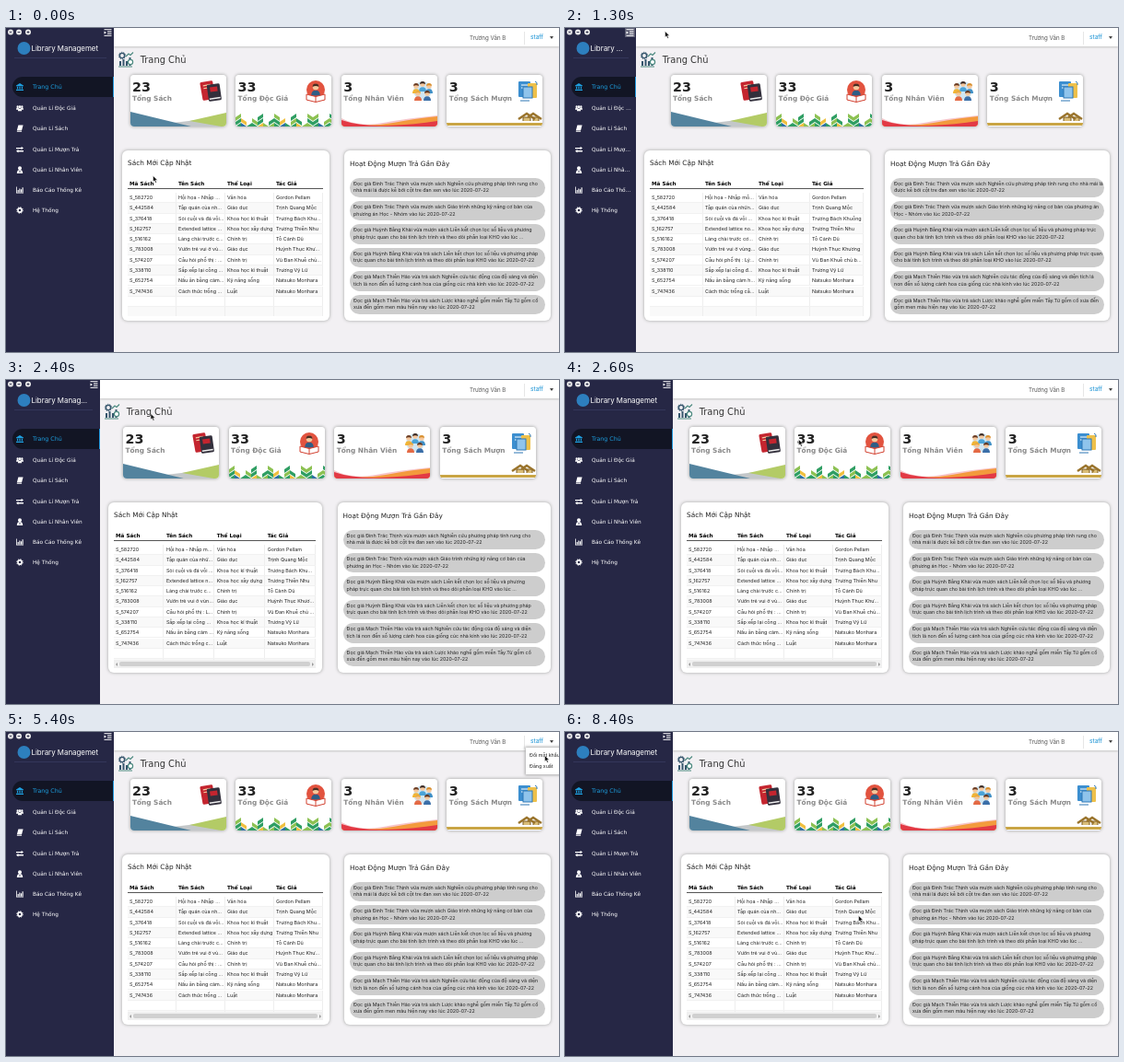
Animation of 600 by 352 pixels, one loop 8500 ms. Source, as an HTML page:

```html
<!DOCTYPE html>
<html lang="vi">
<head>
<meta charset="utf-8">
<title>Library Managemet</title>
<style>
html, body { margin: 0; width: 100%; height: 100%; overflow: hidden; }
#stage {
  --w: 116.5px;
  --half: calc((116.5px - var(--w)) / 2);
  position: relative; width: 600px; height: 352px; overflow: hidden;
  background: #f2f0f3; color: #222; font: 5.4px Inter, Roboto, sans-serif;
}
#stage div, #stage svg { position: absolute; box-sizing: border-box; }
#stage .t { white-space: nowrap; transform: translateY(-50%); line-height: 1.4; }
.v { font-family: "DejaVu Sans", sans-serif; }
.b { font-weight: 700; }
.cut { overflow: hidden; text-overflow: ellipsis; }

#header { left: var(--w); right: 0; top: 0; height: 20px; background: #fff; box-shadow: 0 1px 2px #c4c4c4; }
#caret { left: 590px; top: 9px; border: 2.5px solid transparent; border-top: 3px solid #444; border-bottom: 0; }
#title { left: calc(var(--w) + 4.2px); top: 24.5px; width: 80px; height: 18px; }

#side { left: 0; top: 0; width: var(--w); height: 352px; overflow: hidden; background: #262745; color: #fff; }
#side .rule { left: 9px; right: 8px; top: 32px; height: 1px; background: #34365a; }
#side .active { left: 7px; right: 0; top: 53px; height: 22px; border-radius: 11px 0 0 11px; background: #121524; border-right: 1px solid #1f97dc; }
#side .label { left: 29px; width: calc(var(--w) - 32.5px); font-size: 5.8px; }
#side .on { color: #1d9fe0; }
#side .label.on { font-size: 6.3px; }
#brand { left: 27.5px; top: 22.5px; width: calc(var(--w) - 37px); font-size: 7.9px; }
.narrow #side .label, .narrow #brand { display: none; }
#toggle { left: max(43px, calc(var(--w) - 12px)); top: 0; width: 11px; height: 10px; color: #fff; }
#toggle.hover { background: #5d5e74; }
.narrow #toggle { background: #e2e2e2; color: #777; }

.card { top: 51.3px; width: 104px; height: 56px; border-radius: 4px; overflow: hidden; background: #fff; }
.cardbox { top: 51.3px; width: 104px; height: 56px; border-radius: 4px; box-shadow: 0 0 3px 1px #bbb; }
.panel { top: 133px; height: 185px; border-radius: 6px; background: #fff; box-shadow: 0 0 3px 1px #c2c2c2; }
#books { left: calc(var(--w) + 9px); width: calc(341.5px - var(--half) - var(--w)); }
#log { left: calc(367px - var(--half)); right: 9px; }
#table { left: 6px; right: 7px; top: 30.4px; height: 150px; overflow: hidden; }
.row { left: 0; right: 0; height: 11.28px; border-bottom: 1px solid #f1f1f1; }
.row.odd { background: #f9f9f9; }
.cell { width: 25%; height: 100%; padding-left: 2.5px; line-height: 11px; white-space: nowrap; border-right: 1px solid #eee; }
.head .cell { border: 0; font-size: 5.65px; color: #000; }
#scroll { left: 0; right: 0; top: 141px; height: 9px; background: #f0f0f0; }
#scroll .thumb { left: 6px; right: 6px; top: 2px; height: 5px; border-radius: 2px; background: #d0d0d0; }
#scroll .arrow { top: 2.5px; border: 2px solid transparent; }
.pill { left: 6px; right: 6px; height: 21.5px; border-radius: 10.7px; background: #cdcdcd; }
.pill div { left: 4px; top: 3px; line-height: 7.7px; white-space: pre; font-size: 5.32px; }

#menu { left: 564px; top: 17px; width: 50px; height: 29px; background: #fff; box-shadow: 0 0 3px 1px #aaa; font-size: 5.3px; }
#dialog { left: 223px; top: 73px; width: 153px; height: 133px; background: #f2f2f2; box-shadow: 0 0 3px #888; }
#dialog .bar { left: 0; right: 0; top: 0; height: 12px; background: #585858; }
#dialog .foot { left: 0; right: 0; bottom: 0; height: 16px; background: #d2d2d2; }
#dialog .name { width: 153px; top: 6px; text-align: center; color: #fff; font-size: 8.1px; }
#dialog .lbl { left: 5px; font-size: 5.85px; }
#dialog .line { left: 65px; width: 80px; border-top: 1px solid #d8d8d8; }
#dialog .line.focus { border-top: 1px dashed #2a9ad6; }
#dialog .btn { top: 118px; width: 32px; height: 13px; line-height: 13px; text-align: center; font-size: 6px; background: #a9c6d8; color: #6d8ba0; }
#dialog .btn.go { background: #d4e9f5; color: #223; border: 1px dotted #9cc3da; line-height: 11px; }
</style>
</head>
<body>
<div id="stage">
  <div id="header"></div>
  <div class="t" style="left:503px;top:11.3px;font-size:6.2px;color:#555">Trương Văn B</div>
  <div style="left:562px;top:4px;width:1px;height:14px;background:#e6e6e6"></div>
  <div class="t" style="left:569px;top:11.3px;font-size:6.6px;color:#1590d4">staff</div>
  <div id="caret"></div>
  <div id="title">
    <svg width="18" height="18" viewBox="0 0 18 18" fill="none">
      <circle cx="5" cy="5" r="2.6" stroke="#35556c" stroke-width="1.4"/>
      <circle cx="5" cy="5" r="3.7" stroke="#35556c" stroke-dasharray="1.2 1.1"/>
      <path d="M3 16V11M6.5 16V9M10 16v-5M13.5 16V7" stroke="#35556c" stroke-width="2"/>
      <path d="M1 17h15M9 6l3-3 2 1.5L17 1.5" stroke="#4c8a80" stroke-width="1.2"/>
      <circle cx="14" cy="12" r="2.6" fill="#fff" stroke="#4c8a80" stroke-width="1.2"/>
    </svg>
    <div class="t v" style="left:25px;top:10px;font-size:9.9px;color:#333">Trang Chủ</div>
  </div>
  <div id="cards"></div>
  <div id="books" class="panel">
    <div class="t v" style="left:6.5px;top:13.7px;font-size:7.33px">Sách Mới Cập Nhật</div>
    <div id="table"></div>
  </div>
  <div id="log" class="panel">
    <div class="t v" style="left:6px;top:14.8px;font-size:7.3px">Hoạt Động Mượn Trả Gần Đây</div>
  </div>
  <div id="side">
    <svg width="30" height="9" viewBox="0 0 30 9">
      <g fill="#eee"><circle cx="5" cy="4.5" r="3"/><circle cx="14" cy="4.5" r="3"/><circle cx="24" cy="4.5" r="3"/></g>
      <path d="M4 3.5l2 2m0-2l-2 2M12.6 4.5h2.8M22.6 4.5h2.8M24 3.1v2.8" stroke="#262745" stroke-width=".9"/>
    </svg>
    <svg style="left:12px;top:14px" width="16" height="16"><circle cx="7.5" cy="8" r="7" fill="#2d7fbe"/></svg>
    <div id="brand" class="t cut">Library Managemet</div>
    <div class="rule"></div>
    <div class="active"></div>
  </div>
  <div id="toggle">
    <svg width="11" height="10" viewBox="0 0 11 10" stroke="currentColor">
      <path d="M1.5 1.7h8M5 3.9h4.5M5 6.1h4.5M1.5 8.3h8" fill="none"/>
      <path d="M1.5 3.5L4 5 1.5 6.5z" fill="currentColor" stroke="none"/>
    </svg>
  </div>
  <div id="menu">
    <div class="t" style="left:4px;top:8.5px">Đổi mật khẩu</div>
    <div class="t" style="left:4px;top:20.5px">Đăng xuất</div>
  </div>
  <div id="dialog" class="v">
    <div class="bar"></div>
    <svg width="12" height="12"><circle cx="6" cy="6" r="3.2" fill="#eee"/><path d="M4.8 4.8l2.4 2.4m0-2.4L4.8 7.2" stroke="#444"/></svg>
    <div class="t b name">ĐỔI MẬT KHẨU</div>
    <div class="t lbl" style="top:36px">Mật khẩu hiện tại:</div><div class="line focus" style="top:41px"></div>
    <div class="t lbl" style="top:66px">Mật khẩu mới:</div><div class="line" style="top:72px"></div>
    <div class="t lbl" style="top:96px">Nhập lại mật khẩu:</div><div class="line" style="top:102px"></div>
    <div style="left:68px;top:32px;width:.8px;height:7px;background:#333"></div>
    <div class="foot"></div>
    <div class="btn" style="left:41px">LƯU</div>
    <div class="btn go" style="left:81px">HỦY</div>
  </div>
  <svg id="cursor" width="8" height="10" viewBox="0 0 8 10">
    <path d="M.5.5v6.6l1.6-1.4 1.1 2.5 1.2-.5-1.1-2.5h2.1z" fill="#111" stroke="#fff" stroke-width=".5"/>
  </svg>
</div>
<script>
const $ = id => document.getElementById(id);
const stage = $('stage');

function add(parent, cls, css, html = '') {
  const el = document.createElement('div');
  el.className = cls;
  el.style.cssText = css;
  el.innerHTML = html;
  parent.append(el);
  return el;
}

// Sidebar entries: label, vertical centre, icon in a 10 by 10 box
const person = (x, y, s) => `<circle cx="${x}" cy="${y}" r="${1.8 * s}"/><path d="M${x - 2.6 * s} ${y + 5.5 * s}q0-3.4 ${2.6 * s}-3.4t${2.6 * s} 3.4z"/>`;
const items = [
  ['Trang Chủ', 64, '<path d="M5 0l5 3v1H0V3zM1.2 4.6h1.5v3.2H1.2zM4.2 4.6h1.6v3.2H4.2zM7.3 4.6h1.5v3.2H7.3zM0 8.4h10V10H0z"/>'],
  ['Quản Lí Độc Giả', 86.5, person(2, 3, .75) + person(8, 3, .75) + person(5, 3.5, 1)],
  ['Quản Lí Sách', 109, '<path d="M3 .5h6.5L7.5 8H1zM.8 8.6h6.6l.4 1H1.4z"/>'],
  ['Quản Lí Mượn Trả', 131.5, '<path d="M0 2.5h7V1l3 2.2-3 2.2V4H0zM10 6.4H3V5L0 7.2l3 2.2V8h7z"/>'],
  ['Quản Lí Nhân Viên', 154, '<circle cx="5" cy="2.8" r="2.5"/><path d="M1 10q0-5 4-5t4 5z"/><path d="M5 6v3" stroke="#262745"/>'],
  ['Báo Cáo Thống Kê', 176, '<path d="M0 .5h1v8h9v1H0zM2 5h1.4v3H2zM4.1 3h1.4v5H4.1zM6.2 4h1.4v4H6.2zM8.2 1.5h1.4V8H8.2z"/>'],
  ['Hệ Thống', 197.5, '<circle cx="5" cy="5" r="2.6" fill="none" stroke="currentColor" stroke-width="2"/><circle cx="5" cy="5" r="4.1" fill="none" stroke="currentColor" stroke-width="1.2" stroke-dasharray="1.6 1.62"/>']
];
items.forEach(([label, y, icon], i) => {
  const on = i ? '' : ' on';
  add($('side'), on, `left:11px;top:${y - 4}px;width:8px;height:8px`,
    `<svg width="8" height="8" viewBox="0 0 10 10" fill="currentColor">${icon}</svg>`);
  add($('side'), 't v cut label' + on, `top:${y}px`, label);
});

// Summary cards
const poly = (points, fill) => `<polygon points="${points}" fill="${fill}"/>`;
function tiles() {
  const colors = ['#2f9e63', '#8cc152', '#2f9e63', '#2d6fa3', '#8cc152', '#f0c040', '#2f9e63'];
  let out = '';
  for (let i = 0; i < 18; i++) {
    const x = i * 6, slope = i % 2 ? 4 : -4;
    const rows = 2 + Math.round(Math.sin(i * 1.9 + 1));
    for (let j = 0; j < rows; j++) {
      const y = 54 - j * 5 - slope / 2;
      out += poly(`${x},${y} ${x + 6},${y + slope} ${x + 6},${y + slope + 4} ${x},${y + 4}`, colors[(i * 3 + j * 2) % 7]);
    }
  }
  return out;
}
const figure = (x, y, shirt, hair) =>
  `<g transform="translate(${x} ${y}) scale(.8)"><path d="M-5 10q0-6 5-6t5 6z" fill="${shirt}"/><circle r="3.4" fill="#f5c79c"/><path d="M-3.6 0a3.6 3.6 0 0 1 7.2 0q-3.6-2-7.2 0z" fill="${hair}"/></g>`;
const cards = [
  ['23', 'Tổng Sách',
    poly('46,52 72,49 104,57 30,57', '#c3c7c9') + poly('0,40 70,57 0,57', '#53839e') + poly('104,41 64,50 104,57', '#b3cb66'),
    '<g transform="rotate(-10 84 18)"><rect x="77" y="7" width="14" height="20" rx="1.5" fill="#c4252f"/><path d="M80 11h8M80 14h8" stroke="#f2c9a0" stroke-width="1.2"/></g>' +
    '<g transform="rotate(-8 91 20)"><rect x="84" y="10" width="14" height="18" rx="1.5" fill="#33303c"/><path d="M85 25.5h12" stroke="#eee" stroke-width="1.5"/><rect x="87" y="13" width="8" height="5" fill="#c4252f"/></g>'],
  ['33', 'Tổng Độc Giả', tiles(),
    '<circle cx="87" cy="16" r="10" fill="#e2533f"/><g transform="translate(87 13) scale(1.2)">' + figure(0, 0, '#2f5d86', '#4a2d22') + '</g>' +
    poly('77,21 87,23.5 97,21 97,27 87,29.5 77,27', '#fff') + '<path d="M77 21l10 2.5 10-2.5v6l-10 2.5-10-2.5zM87 23.5v6" fill="none" stroke="#d2402f"/>'],
  ['3', 'Tổng Nhân Viên',
    '<path d="M0 47Q18 57 45 52T104 44V57H0z" fill="#f7c5c9"/><path d="M0 53Q30 57 56 52T104 45V57H0z" fill="#f39a3d"/><path d="M0 49Q20 56 50 55T104 50V57H0z" fill="#e23a45"/>',
    '<circle cx="88" cy="17" r="10" fill="#cfe6f3"/>' + figure(81, 12, '#f1b434', '#6b3d25') + figure(95, 12, '#3e8fc6', '#d9902f') + figure(88, 10, '#4aa3d8', '#3a2a25') +
    figure(83, 20, '#e46a45', '#e7a93c') + figure(93, 20, '#3b6fa8', '#5b3423')],
  ['3', 'Tổng Sách Mượn',
    '<path d="M0 53.5h104" stroke="#c9a545" stroke-width="3"/><path d="M83 50v-4h8v4M94 50v-4h6v4" fill="#d9bd78" stroke="#7a5a22"/><path d="M78 48l9-6 9 6M88 46l6-4 9 6" fill="none" stroke="#9a742c" stroke-width="2.4"/>',
    '<rect x="78" y="7" width="13" height="17" rx="1" fill="#3c8fd0"/><path d="M81 11h7M81 14h7" stroke="#fff"/>' +
    '<rect x="88" y="9" width="10" height="16" rx="1" fill="#eec04a"/><rect x="83" y="13" width="10" height="12" fill="#8fc4ec" stroke="#2c77b4"/><path d="M80 28h10M96 7q3 1 2 4" fill="none" stroke="#2c77b4"/>']
];
cards.forEach(([count, label, footer, icon], i) => {
  const left = `left:calc(${134.5 + 114.6 * i}px - var(--half))`;
  add($('cards'), 'cardbox', left);
  add($('cards'), 'card', left,
    `<svg width="104" height="56" viewBox="0 0 104 56">${footer}${icon}</svg>
     <div class="t v b" style="left:2.5px;top:12.5px;font-size:14.3px">${count}</div>
     <div class="t v b" style="left:2.5px;top:26.2px;font-size:7.35px;color:#8a8a8a">${label}</div>`);
});

// Book table
const books = [
  ['S_582720', 'Hội họa - Nhập môn ngắn gọn', 'Văn hóa', 'Gordon Pellam'],
  ['S_442584', 'Tập quán của những cư dân', 'Giáo dục', 'Trịnh Quang Mộc'],
  ['S_376418', 'Sỏi cuội và đá vôi miền núi', 'Khoa học kĩ thuật', 'Trương Bách Khuông'],
  ['S_162757', 'Extended lattice notes for beams', 'Khoa học xây dựng', 'Trương Thiên Nhu'],
  ['S_516162', 'Làng chài trước cơn gió mùa', 'Chính trị', 'Tô Cảnh Dũ'],
  ['S_783008', 'Vườn trẻ vui ở vùng cao xa', 'Giáo dục', 'Huỳnh Thục Khương'],
  ['S_574207', 'Câu hỏi phố thị : Lý giải mới', 'Chính trị', 'Vũ Đan Khuê chủ biên'],
  ['S_338110', 'Sắp xếp lại công đoạn sấy', 'Khoa học kĩ thuật', 'Trương Vỹ Lữ'],
  ['S_652754', 'Nấu ăn bằng cảm hứng mới', 'Kỹ năng sống', 'Natsuko Morihara'],
  ['S_747436', 'Cách thức trồng cây cảnh nhỏ', 'Luật', 'Natsuko Morihara'],
  ['', '', '', ''], ['', '', '', '']
];
const cells = row => row.map((text, i) => `<div class="cell cut" style="left:${i * 25}%">${text}</div>`).join('');
add($('table'), 'row head v b', 'top:.5px;height:11.6px;border-bottom:1px solid #555', cells(['Mã Sách', 'Tên Sách', 'Thể Loại', 'Tác Giả']));
books.forEach((row, i) => add($('table'), 'row' + (i % 2 ? ' odd' : ''), `top:${15.6 + 11.28 * i}px`, cells(row)));
const scroll = add($('table'), '', '', '<div class="thumb"></div><div class="arrow" style="left:0;border-right-color:#999"></div><div class="arrow" style="right:0;border-left-color:#999"></div>');
scroll.id = 'scroll';

// Activity log; {n} breaks the line in layout n: wide, middle or narrow sidebar
const loans = [
  'Đinh Trác Thịnh vừa mượn sách Nghiên cứu phương pháp tính rung cho {0}nhà mái lá {1}được {2}kê bởi cột tre đan xen vào lúc',
  'Đinh Trác Thịnh vừa mượn sách Giáo trình những kỹ năng cơ bản của {0}phương án {1}Học - {2}Nhóm vào lúc',
  'Huỳnh Bằng Khải vừa mượn sách Liên kết chọn lọc số liệu và phương {0}pháp trực {1}quan {2}cho bài tính lịch trình và theo dõi phân loại KHO vào lúc',
  'Huỳnh Bằng Khải vừa trả sách Liên kết chọn lọc số liệu và phương pháp {0}trực quan {1}cho {2}bài tính lịch trình và theo dõi phân loại KHO vào lúc',
  'Mạch Thiên Hảo vừa trả sách Nghiên cứu tác động của độ sáng và diện {0}tích lá {1}non {2}đến số lượng cánh hoa của giống cúc nhà kính vào lúc',
  'Mạch Thiên Hảo vừa trả sách Lược khảo nghề gốm miền Tây.Từ gốm cổ {0}xưa đến {1}gốm {2}men màu hiện nay vào lúc'
];
const pills = loans.map((_, i) => add(add($('log'), 'pill', `top:${29.5 + 25.4 * i}px`), '', ''));
let layout = -1;
function wrapLog(next) {
  if (next === layout) return;
  layout = next;
  loans.forEach((text, i) => {
    const date = next === 0 && i === 2 ? '...' : '2020-07-22';
    pills[i].textContent = `Đọc giả ${text} ${date}`.replace(/\{(\d)\}/g, (_, n) => +n === next ? '\n' : '');
  });
}

// Motion
const LOOP = 8500, STEP = 100;
const path = [ // time, x, y
  [0, 159, 160], [200, 159, 160], [900, 110, 5], [1300, 108, 3], [1900, 39, 9], [2050, 47, 5],
  [2200, 60, 8], [2600, 253, 64], [3500, 584, 10], [3900, 584, 8], [4500, 584, 25],
  [6600, 584, 25], [7400, 318, 199], [LOOP, 318, 199]
];
const clamp = x => Math.min(1, Math.max(0, x));
const ramp = (t, start, length) => clamp((t - start) / length);
function cursorAt(t) {
  const i = path.findIndex(p => p[0] > t);
  const [t0, x0, y0] = path[i - 1], [t1, x1, y1] = path[i];
  const k = ramp(t, t0, t1 - t0), e = k * k * (3 - 2 * k);
  return [x0 + (x1 - x0) * e, y0 + (y1 - y0) * e];
}
const show = (el, on) => { el.style.display = on ? '' : 'none'; };
const within = (t, a, b) => t >= a && t < b;

function draw(t) {
  const w = 116.5 - 75 * (ramp(t, 1100, 375) - ramp(t, 2100, 375));
  stage.style.setProperty('--w', w + 'px');
  stage.classList.toggle('narrow', w < 54);
  wrapLog(w > 100 ? 0 : w > 58 ? 1 : 2);
  $('toggle').classList.toggle('hover', within(t, 1000, 1500));
  show(scroll, t >= 2300);
  show($('menu'), within(t, 3800, 6500));
  show($('dialog'), within(t, 6500, 7700));
  const [x, y] = cursorAt(t);
  $('cursor').style.transform = `translate(${x}px, ${y}px)`;
}

const start = performance.now();
function tick(now) {
  const t = Math.max(0, now - start) % LOOP;
  draw(Math.floor(t / STEP) * STEP);
  requestAnimationFrame(tick);
}
$('cursor').style.left = $('cursor').style.top = 0;
draw(0);
requestAnimationFrame(tick);
</script>
</body>
</html>
```
